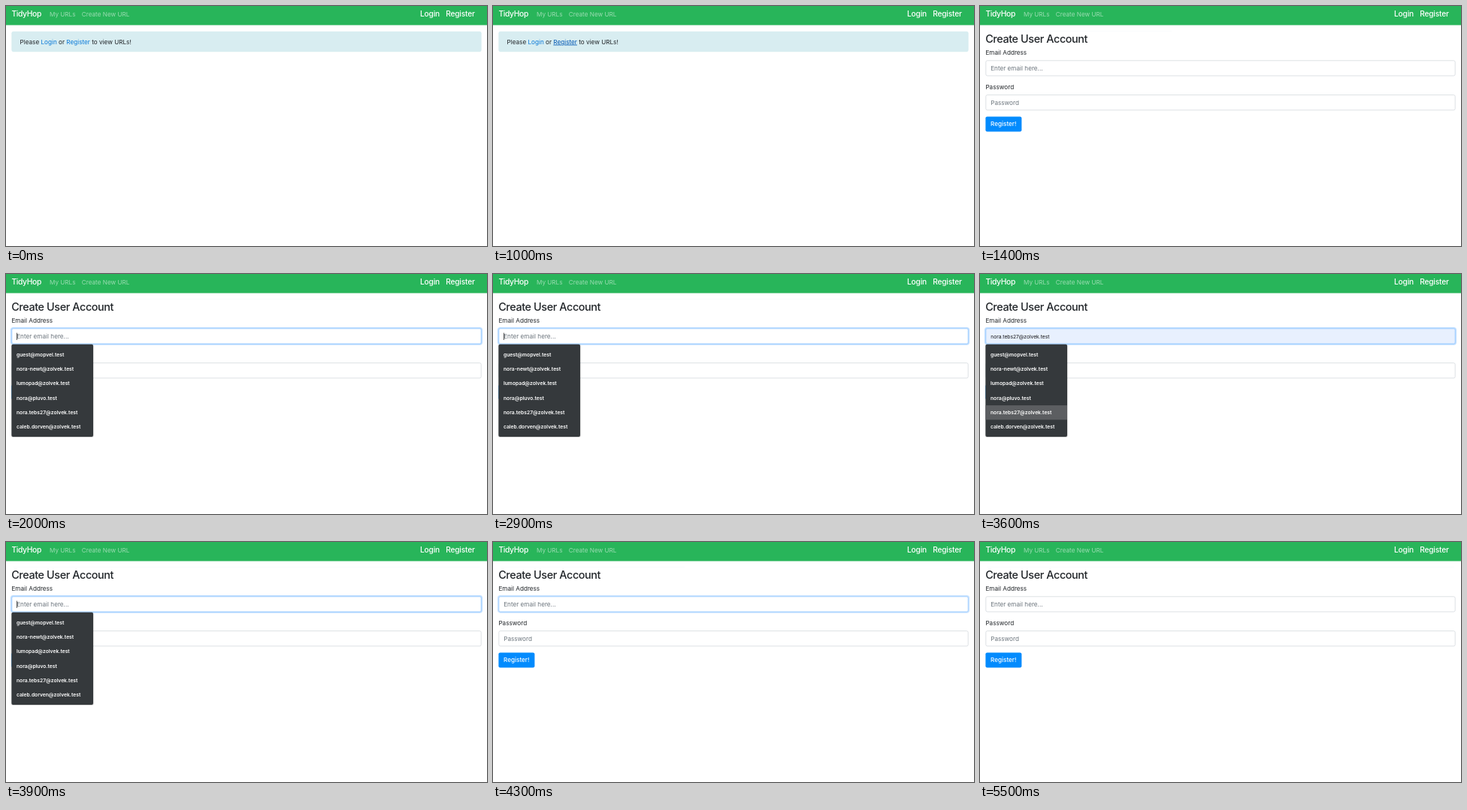
Recreate the animation shown at these times as an HTML page. Size 640 px wide and 320 px high, loop 5.6 s.

```html
<!DOCTYPE html>
<html lang="en">
<head>
<meta charset="utf-8">
<title>Sign-up form</title>
<style>
html, body { margin: 0; width: 100%; height: 100%; overflow: hidden; background: #fff; }
svg { display: block; width: 640px; height: 320px; }
text { font-family: Inter, Roboto, "Liberation Sans", sans-serif; font-size: 8.16px; fill: #212529; white-space: pre; }
.brand { font-size: 10.3px; font-weight: 500; letter-spacing: -.35px; fill: #fff; }
.account { font-size: 10.2px; font-weight: 500; letter-spacing: -.2px; fill: #fff; }
.nav { fill: #fff; fill-opacity: .53; }
.title { font-size: 14.4px; font-weight: 500; letter-spacing: -.4px; }
.hint { fill: #6c757d; }
.button { font-weight: 500; font-size: 8.1px; fill: #fff; }
.link { fill: #0b7ad8; }
.link.hover { fill: #0056b3; text-decoration: underline; }
.item { font-size: 6.72px; font-weight: 600; fill: #fff; }
.preview { font-size: 6.7px; fill: #111; }
</style>
</head>
<body>
<svg id="stage" viewBox="0 0 640 320" xmlns="http://www.w3.org/2000/svg">
  <rect width="640" height="320" fill="#fff"/>
  <rect width="640" height="25.5" fill="#28b55a"/>
  <text class="brand" x="7.4" y="14.3">TidyHop</text>
  <text class="nav" x="58" y="14">My URLs</text>
  <text class="nav" x="100.8" y="14">Create New URL</text>
  <text class="account" x="551" y="14.3">Login</text>
  <text class="account" x="585.2" y="14.3">Register</text>

  <g id="notice">
    <rect x="7.75" y="34.25" width="624.5" height="26.5" rx="2" fill="#d8edf1" stroke="#c8e6eb" stroke-width=".5"/>
    <text x="18.5" y="50.6" fill="#1c3a42">Please <tspan class="link">Login</tspan> or <tspan class="link" id="join">Register</tspan> to view URLs!</text>
  </g>

  <g id="form">
    <text class="title" x="7.2" y="48.6">Create User Account</text>
    <text x="7.4" y="65.4">Email Address</text>
    <rect id="ring" x="6.8" y="71.8" width="626.4" height="22" rx="2.8" fill="none" stroke="#007bff" stroke-opacity=".25" stroke-width="1.7"/>
    <rect id="email" x="7.8" y="72.8" width="624.4" height="20.2" rx="2" stroke-width=".7"/>
    <text class="hint" id="hint" x="14.2" y="86.1">Enter email here...</text>
    <text class="preview" id="preview" x="14.2" y="85.9"></text>
    <rect id="caret" x="14" y="78.5" width=".7" height="9.5" fill="#111"/>
    <text x="7.4" y="111">Password</text>
    <rect x="7.8" y="118.6" width="624.4" height="20.2" rx="2" fill="#fff" stroke="#ced4da" stroke-width=".7"/>
    <text class="hint" x="14.2" y="131.8">Password</text>
    <rect x="7.4" y="147.4" width="48" height="20.1" rx="2.2" fill="#038bfd"/>
    <text class="button" x="14.1" y="160.4">Register!</text>
  </g>

  <g id="menu">
    <rect x="7" y="94" width="109.6" height="123.8" rx="2.4" fill="#000" opacity=".2"/>
    <rect x="7.4" y="93.7" width="108.6" height="123.3" rx="2" fill="#35393c"/>
    <rect id="bar" x="7.4" width="108.6" height="19.2" fill="#5c5e61"/>
  </g>
</svg>
<script>
const LOOP = 5600, STEP = 100;
const ROW_TOP = 98.1, ROW = 19.2;
const HOVER = 1000, FORM = 1400, FOCUS = 1900, CLOSE = 4300, BLUR = 4400, BLINK = 500;

const emails = [
  "guest@mopvel.test",
  "nora-newt@zolvek.test",
  "lumopad@zolvek.test",
  "nora@pluvo.test",
  "nora.tebs27@zolvek.test",
  "caleb.dorven@zolvek.test"
];

// [time, highlighted row]; -1 means none
const picks = [[0, -1], [3000, 0], [3100, 1], [3200, 2], [3400, 3], [3500, 4], [3900, -1]];

const el = id => document.getElementById(id);
const show = (id, on) => el(id).setAttribute("visibility", on ? "visible" : "hidden");
const set = (id, attrs) => {
  for (const key in attrs) el(id).setAttribute(key, attrs[key]);
};

emails.forEach((mail, i) => {
  const row = document.createElementNS("http://www.w3.org/2000/svg", "text");
  row.textContent = mail;
  row.setAttribute("class", "item");
  row.setAttribute("x", 14);
  row.setAttribute("y", ROW_TOP + ROW * i + 11.9);
  el("menu").append(row);
});

function glow(t) {
  if (t < FOCUS || t >= BLUR) return 0;
  if (t < FOCUS + STEP) return 0.6;
  return t < CLOSE ? 1 : 0.85;
}

function draw(t) {
  const onForm = t >= FORM;
  const open = t >= FOCUS && t < CLOSE;
  const pick = picks.filter(p => p[0] <= t).pop()[1];
  const picked = pick >= 0;
  const shine = glow(t);

  // display keeps hidden groups from showing their visible children
  set("notice", { display: onForm ? "none" : "inline" });
  set("form", { display: onForm ? "inline" : "none" });
  set("menu", { display: open ? "inline" : "none" });
  el("join").classList.toggle("hover", t >= HOVER);

  set("ring", { opacity: shine });
  set("email", {
    fill: picked ? "#e8f0fe" : "#fff",
    stroke: shine ? "#80bdff" : "#ced4da"
  });
  show("hint", !picked);
  show("caret", open && Math.floor((t - FOCUS) / BLINK) % 2 === 0);
  el("preview").textContent = picked ? emails[pick] : "";
  show("bar", picked);
  set("bar", { y: ROW_TOP + ROW * Math.max(pick, 0) + .2 });
}

const start = performance.now();
function tick() {
  draw((performance.now() - start) % LOOP);
  requestAnimationFrame(tick);
}
tick();
</script>
</body>
</html>
```
